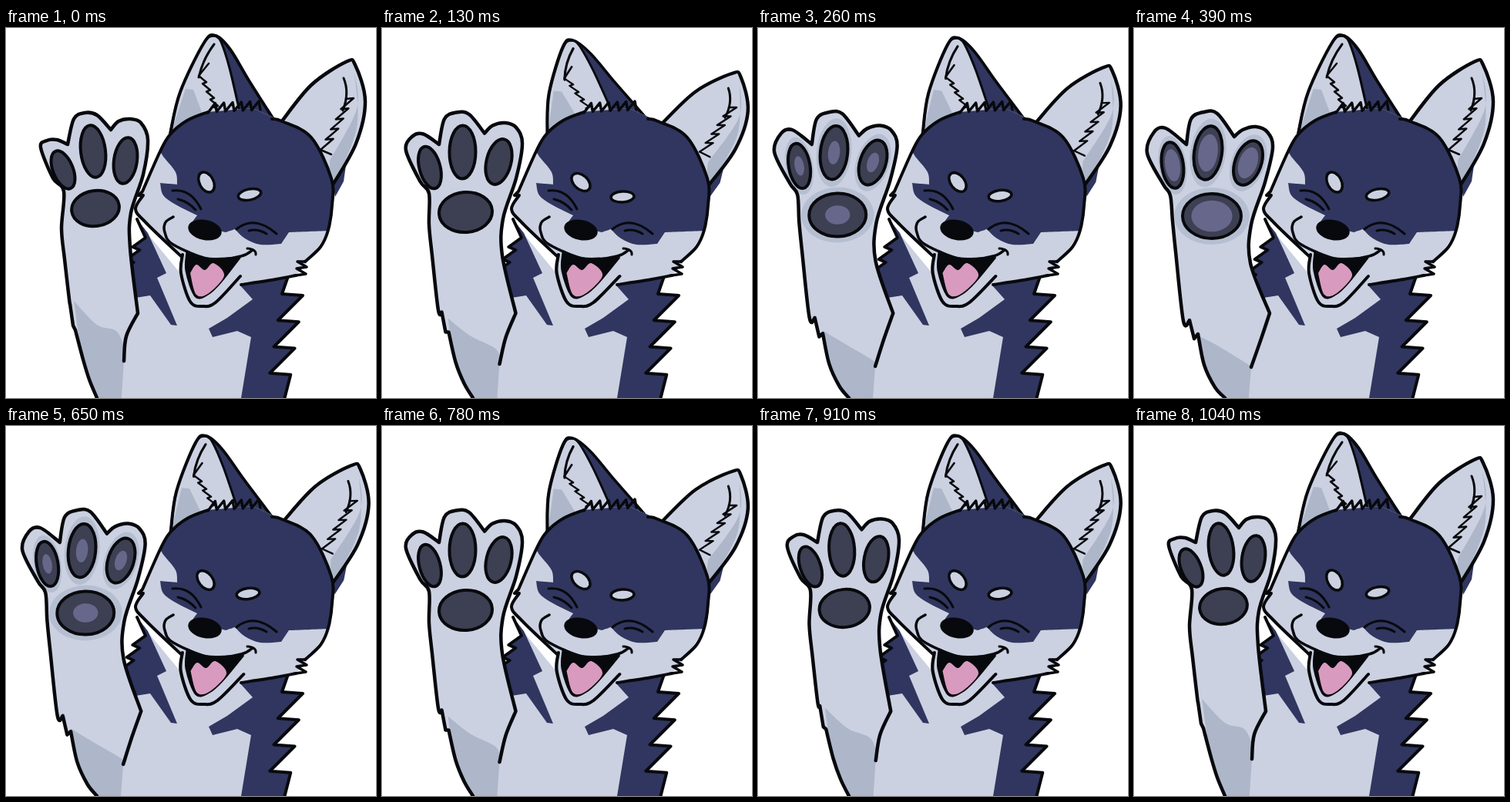
These frames come from a looping animation (480x480 px, 1.17 s). An HTML page:

```html
<!DOCTYPE html>
<html lang="en">
<head>
<meta charset="utf-8">
<title>Waving wolf</title>
<style>
html, body { margin: 0; width: 100%; height: 100%; overflow: hidden; background: #fff; }
#strip { display: block; width: 900vw; height: 100vh; animation: wave 1170ms steps(9) -1ms infinite; }
path, ellipse { stroke: #08090d; stroke-linecap: round; stroke-linejoin: round; }
@keyframes wave { to { transform: translateX(-900vw); } }
</style>
</head>
<body>
<svg id="strip" viewBox="0 0 4320 480"></svg>
<script>
const LIGHT = '#cbd1e1', SHADE = '#adb7c9', NAVY = '#30365f', INK = '#08090d',
      PAD = '#3d3f52', GLEAM = '#66678a', PINK = '#d99abf';

// Head dip and arm swing (0 right, 1 left) on each beat of 130 ms.
const NOD = [0, 1, .5, 0, 0, .5, 1, .5, 0];
const SWING = [0, .5, .85, 1, 1, .85, .5, .25, 0];

// Smooth curve through "x,y" points; a slash marks a corner.
function curve(text) {
  if (text[0] === 'M') return text;
  let last, d = '';
  for (const part of text.split('/')) {
    const pts = part.trim().split(' ').map(p => p.split(',').map(Number));
    if (last) pts.unshift(last); else d = 'M' + pts[0];
    for (let i = 0; i < pts.length - 1; i++) {
      const b = pts[i], c = pts[i + 1], a = pts[i - 1] || b, e = pts[i + 2] || c;
      const k = [0, 1].map(j => b[j] + (c[j] - a[j]) / 6);
      const m = [0, 1].map(j => c[j] - (e[j] - b[j]) / 6);
      d += `C${k} ${m} ${c}`;
    }
    last = pts[pts.length - 1];
  }
  return d;
}
const fill = (s, color, end = '') => `<path d="${curve(s)}${end}" fill="${color}" stroke="none" style="stroke:none"/>`;
const line = (s, w = 4) => `<path d="${curve(s)}" fill="none" stroke-width="${w}"/>`;
const shape = (s, color, w) => fill(s, color) + line(s, w);
const arc = (x, y, cx, cy, ex, ey) => line(`M${x} ${y}Q${cx} ${cy} ${ex} ${ey}`, 3);
function oval(s, color, w, k = 1) {
  const [x, y, rx, ry, r] = s.split(',').map(Number);
  return `<ellipse rx="${rx * k}" ry="${ry * k}" fill="${color}" stroke-width="${w}" transform="translate(${x} ${y}) rotate(${r})"/>`;
}
const group = (transform, body) => `<g transform="${transform}">${body}</g>`;

// Row of n fur spikes along a line, each leaning by dx, dy.
function fur(x, y, ex, ey, n, dx, dy) {
  let d = '';
  for (let i = 1; i <= n; i++) {
    const px = x + (ex - x) * i / n, py = y + (ey - y) * i / n;
    d += `L${px + dx} ${py + dy}L${px} ${py}`;
  }
  return d;
}
// Blend two strings of numbers with the same layout.
function mix(a, b, u) {
  const n = b.match(/-?[\d.]+/g);
  let i = 0;
  return a.replace(/-?[\d.]+/g, v => +v + (n[i++] - v) * u);
}

function torso() {
  const flank = 'M170 248L181 272' + fur(181, 272, 158, 320, 3, -9, -4);
  const side = 'M361 482' + fur(337, 482, 358, 345, 4, 27, 2) + 'L366 322';
  return fill('M182 265L240 335L330 325L315 480H140L160 330Z', LIGHT)
    + fill(flank, NAVY, 'L168 350L187 347L214 385L222 386L196 324L208 318L184 266Z') + line(flank)
    + fill(side, NAVY, 'L303 333L320 352L287 376L263 390L268 401L300 393L318 401L305 480Z') + line(side);
}

function ears(nod) {
  const lean = .2 * nod, squash = 1 - .05 * nod;
  const outerL = '213,137 226,83 257,19 272,10 291,28 315,68 348,120';
  const innerL = '213,137 226,83 257,19 272,10 / 279,18 290,52 303,108';
  const earR = '357,122 396,74 441,44 453,48 466,95 454,150 423,205';
  return group(`matrix(1 0 ${lean} ${squash} ${-130 * lean} ${130 * (1 - squash)})`,
      fill(outerL, NAVY) + fill(innerL, LIGHT) + fill('M214 136L233 79L243 80L255 112Z', SHADE)
      + line(innerL, 3) + line(outerL)
      + arc(270, 21, 255, 41, 250, 64) + line('M263 46L250 62' + fur(250, 62, 270, 103, 4, 5, -2), 2.5))
    + group(`translate(424 206) rotate(${5 * nod}) scale(1 ${1 - .08 * nod}) translate(-424 -206)`,
      fill('M424 203L441 178L438 199L427 219Z', NAVY)
      + fill(earR, LIGHT) + fill('452,58 455,105 420,172 / 423,203 455,130 452,58', SHADE) + line(earR, 4.5)
      + arc(438, 65, 446, 84, 437, 107) + line('M422 164L408 158' + fur(408, 158, 441, 92, 5, 10, -1), 2.5));
}

function face(nod) {
  const crown = '262,109 235,120 213,138 200,160';
  const cheekL = '168,235 182,253 228,297';
  const dome = '423,230 422,195 396,142 358,121';
  return fill(`${crown} 176,214 / ${cheekL} / 240,330 / 305,333 376,321 / 390,305 418,262 ${dome} / 320,104 / 262,109`, LIGHT)
    + fill(`${crown} / 205,168 220,187 222,203 / 200,201 / 204,217 220,229 248,243 / 240,254 / 285,265 / 297,261 / 310,273 330,281 357,280 / 367,265 / 419,263 / ${dome} / 320,104 / 262,109`, NAVY)
    + line(`${crown} 177,212 / 172,217 / 178,217 / ${cheekL}`)
    + line('305,333 350,326 376,321') + line('M388 303L378 303' + fur(378, 303, 376, 321, 2, 13, -2), 3.5)
    + line(`388,303 408,284 418,262 ${dome} 345,118`)
    + line('M262 110' + fur(262, 109, 330, 106, 6, -2, -11), 3.5)
    + arc(216, 211, 240, 208, 253, 235) + arc(223, 222, 236, 225, 246, 236)
    + arc(299, 261, 322, 242, 351, 267) + arc(315, 263, 326, 260, 338, 267)
    + oval(`${260 - 2 * nod},200,9,14,${-28 - 20 * nod}`, LIGHT, 3.5)
    + oval(`${316 - 4 * nod},${216 + 3 * nod},15,7,${9 * nod - 12}`, LIGHT, 3.5)
    + group(`translate(232 0) scale(${nod ? 1.06 : 1} 1) translate(-232 0)`,
      fill('229,294 227,318 239,355 255,361 272,356 304,322', LIGHT, 'L303 296Z')
      + line('229,294 227,318 239,355 255,361 272,356 304,322')
      + shape('235,290 260,299 303,298 / 278,330 262,345 246,348 234,315 235,290', INK, 3)
      + fill('239,318 247,307 258,314 269,305 283,321 263,344 247,346 239,318', PINK))
    + line('217,245 207,252 206,265 217,281 265,300 305,296 320,288', 3.5) + arc(313, 286, 325, 287, 324, 294)
    + oval('258,262,21,12,12', INK, 2);
}

const right = {
  edge: '118,480 108,456 100,430 90,392 / 87,386 / 83,358 / 82,352 76,300 72,260 75,212 61,195 45,155 53,146 66,145 80,151 / 88,118 102,110 118,113 136,132 / 146,121 161,118 175,123 184,145 178,190 162,240 161,285 171,370 / 156,400 153,432',
  toes: '74,184,13,26,-22 113,160,16,34,-7 155,172,15,30,8',
  pad: '116,234,31,23,-8',
  shade: '88,354 118,385 143,393 154,415 / 150,480 / 118,480 / 100,430 88,354'
};
const left = {
  edge: '118,480 105,466 91,437 83,397 / 78,403 / 72,379 / 64,380 54,290 50,250 47,217 38,203 17,162 26,135 41,130 68,151 / 74,118 91,109 108,111 130,141 / 141,132 158,128 173,135 180,155 170,200 152,255 151,305 176,370 / 165,403 152,440',
  toes: '50,178,14,30,-8 96,162,18,35,8 148,175,17,30,20',
  pad: '101,244,38,29,0',
  shade: '83,399 110,413 149,437 152,440 / 149,480 / 118,480 / 91,437 83,399'
};

function arm(swing) {
  const part = key => mix(right[key], left[key], swing);
  const edge = part('edge'), pads = [...part('toes').split(' '), part('pad')];
  const glow = Math.max(0, swing - .6) * 1.75;
  const layer = (color, w, k) => pads.map(p => oval(p, color, w, k)).join('');
  const plain = body => body.replaceAll('<ellipse', '<ellipse style="stroke:none"');
  return fill(edge, LIGHT, 'L150 480Z') + fill(part('shade'), SHADE)
    + (glow ? plain(layer('#b6bfd1', 0, 1.28)) : '')
    + line(edge, 4.5) + layer(PAD, 4, 1)
    + (glow ? plain(layer(GLEAM, 0, glow)) : '');
}

document.getElementById('strip').innerHTML = NOD.map((nod, i) =>
  `<svg x="${480 * i}" width="480" height="480" viewBox="0 0 480 480">${torso()}${ears(nod)}${face(nod)}${arm(SWING[i])}</svg>`
).join('');
</script>
</body>
</html>
```
